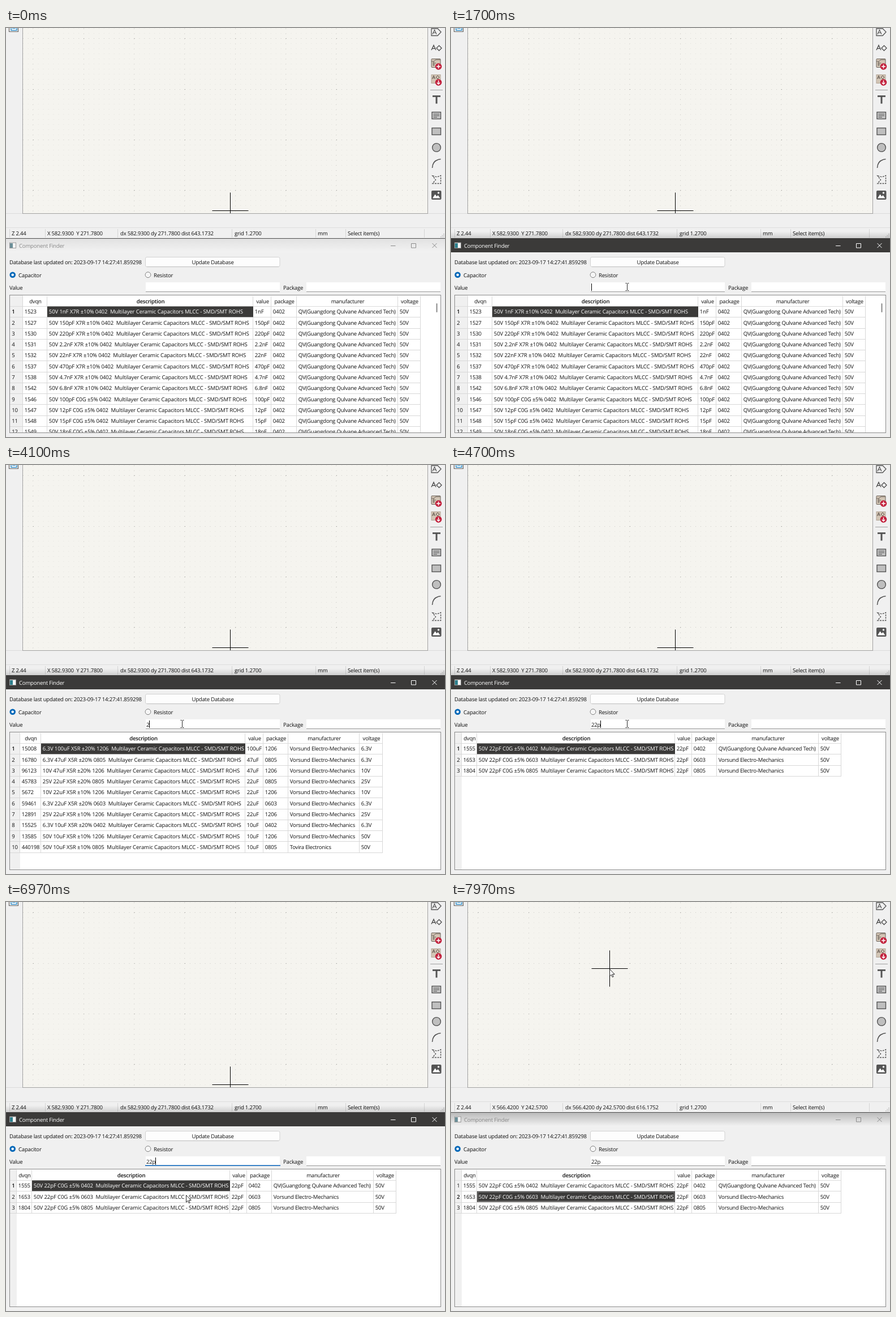
Recreate the animation shown at these times as an HTML page. Size 776 px wide and 722 px high, loop 8 s.

```html
<!DOCTYPE html>
<html lang="en">
<head>
<meta charset="utf-8">
<title>Component Finder</title>
<style>
html, body { margin: 0; width: 100%; height: 100%; overflow: hidden; background: #f0f0f0; }
svg { display: block; width: 776px; height: 722px; }
text {
  font: 9.6px "Open Sans", "Noto Sans", sans-serif;
  letter-spacing: -.23px; white-space: pre; text-rendering: geometricPrecision; fill: #111;
}
.b { font-weight: 600; }
.m { text-anchor: middle; }
.wide { letter-spacing: -.13px; }
.sel { fill: #fff; }
</style>
</head>
<body>
<svg id="stage" viewBox="0 0 776 722" xmlns="http://www.w3.org/2000/svg"></svg>
<script>
const LOOP = 8000, STEP = 200 / 3, CELL = 8.937;
const ORIGIN = { x: 396.3, y: 322.6, col: 459, row: 214 };
const INK = '#545454';

const rect = (x, y, w, h, fill, more = '') =>
  `<rect x="${x}" y="${y}" width="${w}" height="${h}" fill="${fill}" ${more}/>`;
const text = (x, y, s, more = '') => `<text x="${x}" y="${y}" ${more}>${s}</text>`;
const path = (d, stroke, more = '') => `<path d="${d}" fill="none" stroke="${stroke}" ${more}/>`;
const vline = (x, y1, y2, stroke) => path(`M${x} ${y1}V${y2}`, stroke);
const hline = (y, x1, x2, stroke) => path(`M${x1} ${y}H${x2}`, stroke);

// ---- static parts ----
function grid() {
  const x0 = ORIGIN.x - 41 * CELL, y0 = ORIGIN.y - 36 * CELL;
  const dash = step => `stroke-dasharray="1 ${step - 1}"`;
  let out = '';
  for (let i = 0; i < 37; i++) {
    const y = Math.floor(y0 + i * CELL) + .5, major = (ORIGIN.row - 36 + i) % 10 === 0;
    out += path(`M${x0} ${y}H745`, major ? '#c9c8c4' : '#e2e1dc', dash(CELL));
    if (major) out += path(`M${ORIGIN.x - 39 * CELL} ${y}H745`, '#8f8f8c', dash(CELL * 10));
  }
  for (let i = 0; i < 8; i++) {
    const x = Math.floor(ORIGIN.x + (i * 10 - 39) * CELL) + .5;
    out += path(`M${x} ${y0}V327`, '#cfcec9', dash(CELL));
  }
  return out;
}

function badge(y, sign) {
  return `<circle cx="764.5" cy="${y}" r="5.8" fill="#c2203c"/>` +
    path(sign, '#fff', 'stroke-width="1.5"');
}

function toolbar() {
  const solid = `stroke="${INK}" stroke-width="1.4"`;
  return path('M5.5 0V6.5H21.5V0', '#666', 'stroke-width="1.2"') +
    rect(9, -4, 10, 8, '#fff', 'stroke="#1a81c4" stroke-width="1.3"') + hline(.5, 11, 17, '#1a81c4') +
    path('M752 1H763L769 7 763 13.5H752Z', INK, 'stroke-width="1.3"') +
    path('M754 11L757.5 3.5 761 11M755.5 8.5H759.7', INK, 'stroke-width="1.2"') +
    path('M752 39L756 30.5 760 39M753.5 36.2H758.5M761 35.5L765.5 31 770 35.5 765.5 40Z', INK, 'stroke-width="1.4"') +
    rect(752, 54.5, 16, 15, '#d3c5b5', 'stroke="#6b625a" rx="1"') +
    path('M752 59H756L760 56H768M754 62H760M754 65H758M756 59V67', '#6b625a') +
    badge(68, 'M761 68H768M764.5 64.5V71.5') +
    rect(752, 82.5, 16, 15, '#d3c5b5', 'stroke="#b3a697"') +
    path('M753.5 90L756 84 758.5 90M754.5 88H757.5M760 87L763 84 766 87 763 90Z', '#5a5149') +
    badge(96, 'M764.5 92.5V99M761.8 96.5L764.5 99.2 767.2 96.5') +
    hline(109.5, 750, 772, '#a0a0a0') +
    rect(754, 119, 14, 2.8, INK) + rect(759.5, 119, 3, 14.5, INK) +
    rect(753, 148.5, 15.5, 12, '#c4c4c4', solid) + path('M755.5 152H766M755.5 154.8H766M755.5 157.5H762', INK) +
    rect(753, 176.5, 15.5, 12, '#bfbfbf', solid) +
    `<circle cx="761" cy="211" r="7.4" fill="#bfbfbf" ${solid}/>` +
    path('M753.5 247Q754 233 768.5 231.5', INK, 'stroke-width="1.5"') +
    path('M754 261L762 263 768.5 260.5V274.5H754L759.5 268Z', INK, 'stroke-width="1.4" stroke-dasharray="3 1.6"') +
    rect(752, 287, 17.5, 16, INK, 'rx="2"') +
    '<path d="M754 300.5L758.5 293.5 761.5 297.5 763.5 295 767.5 300.5Z" fill="#fff"/>' +
    '<circle cx="764.5" cy="291" r="1.7" fill="#fff"/>';
}

function statusBar() {
  let out = rect(0, 353, 776, 18, '#f0f0f0') + hline(352.5, 0, 776, '#dedede');
  for (const x of [6.5, 69.5, 197.5, 399.5, 547.5, 600.5, 739.5]) out += vline(x, 355, 370, '#d4d4d4');
  for (let i = 0; i < 6; i++) {
    const row = i < 3 ? 2 : i < 5 ? 1 : 0, col = [0, 1, 2, 1, 2, 2][i];
    out += rect(768 + col * 2.6, 363 + row * 2.6, 1.4, 1.4, '#b0b0b0');
  }
  return out + text(10, 366, 'Z 2.44') + text(404, 366, 'grid 1.2700') +
    text(551, 366, 'mm') + text(604, 366, 'Select item(s)');
}

function form() {
  const field = (x, w) => rect(x, 449, w, 17, '#fff') + hline(465.5, x, x + w, '#9a9a9a');
  return rect(0, 396, 776, 326, '#f0f0f0') +
    text(6, 417.3, 'Database last updated on: 2023-09-17 14:27:41.859298') +
    rect(246.5, 404.5, 237.5, 17, '#fdfdfd', 'stroke="#d2d2d2" rx="2.5"') + hline(421.5, 249, 482, '#bdbdbd') +
    text(365.5, 417.3, 'Update Database', 'class="m"') +
    '<circle cx="11.7" cy="435.7" r="5.3" fill="#0067b8"/><circle cx="11.7" cy="435.7" r="2.3" fill="#fff"/>' +
    '<circle cx="251" cy="435.7" r="4.9" fill="#f6f6f6" stroke="#808080"/>' +
    text(22, 439.6, 'Capacitor') + text(261, 439.6, 'Resistor') +
    text(6, 461.5, 'Value') + text(490, 461.5, 'Package') +
    field(247, 237) + field(531, 237);
}

// ---- tables: rows are "id volts value dielectric tolerance package maker" ----
const HEADS = ['dvqn', 'description', 'value', 'package', 'manufacturer', 'voltage'];
const MAKERS = {
  Q: 'QV(Guangdong Qulvane Advanced Tech)',
  V: 'Vorsund Electro-Mechanics',
  T: 'Tovira Electronics'
};
const expand = (list, head, tail) => list.split(',').map(r => {
  const [id, val] = r.split(' ');
  return `${id} ${head} ${val} ${tail}`;
});
const TABLES = [
  {
    edges: [30, 73, 437, 469, 514, 693, 733], bar: true,
    rows: [
      ...expand('1523 1nF,1527 150pF,1530 220pF,1531 2.2nF,1532 22nF,1537 470pF,1538 4.7nF,1542 6.8nF', '50V', 'X7R 10 0402 Q'),
      ...expand('1546 100pF,1547 12pF,1548 15pF,1549 18pF', '50V', 'C0G 5 0402 Q')
    ]
  },
  {
    edges: [25, 62, 423, 455, 499, 625, 666],
    rows: [
      '15008 6.3V 100uF X5R 20 1206 V', '16780 6.3V 47uF X5R 20 0805 V', '96123 10V 47uF X5R 20 1206 V',
      '45783 25V 22uF X5R 20 0805 V', '5672 10V 22uF X5R 10 1206 V', '59461 6.3V 22uF X5R 20 0603 V',
      '12891 25V 22uF X5R 10 1206 V', '15525 6.3V 10uF X5R 20 0402 V', '13585 50V 10uF X5R 10 1206 V',
      '440198 50V 10uF X5R 10 0805 T'
    ]
  },
  {
    edges: [19, 46, 396, 426, 470, 650, 690],
    rows: ['1555 50V 22pF C0G 5 0402 Q', '1653 50V 22pF C0G 5 0603 V', '1804 50V 22pF C0G 5 0805 V']
  }
];
const TOP = 491.5, PITCH = 19.27;

function cells(row) {
  const [id, volts, val, kind, tol, pkg, maker] = row.split(' ');
  const desc = `${volts} ${val} ${kind} ±${tol}% ${pkg}  Multilayer Ceramic Capacitors MLCC - SMD/SMT ROHS`;
  return [id, desc, val, pkg, MAKERS[maker], volts];
}

function table({ edges, rows, bar }, sel, hover) {
  const left = edges[0], right = edges[6], bottom = TOP + rows.length * PITCH;
  let out = rect(7, 472, 761, 242, '#fff') + rect(7, 472, left - 7, 242, '#f0f0f0');
  if (hover >= 0) out += rect(edges[hover], 473, edges[hover + 1] - edges[hover], 18, '#d9ebf9');
  HEADS.forEach((h, i) => {
    out += text((edges[i] + edges[i + 1]) / 2 + .5, 485.6, h, `class="m${i === 1 ? ' b' : ''}"`);
  });
  out += hline(TOP, 7, right, '#dcdcdc');
  for (const x of edges) out += vline(x - .5, 473, bottom, '#d8d8d8');
  rows.forEach((row, r) => {
    const y = TOP + r * PITCH, on = r === sel;
    out += hline(Math.floor(y + PITCH) + .5, 7, right, '#d8d8d8');
    out += text(10.3, y + 12.9, r + 1, on ? 'class="b"' : '');
    if (on) {
      const w = edges[2] - edges[1];
      out += rect(edges[1], y, w, PITCH - .5, '#3b3a39');
      if (r) out += rect(edges[1] + 1.5, y + 1.5, w - 3, PITCH - 3.5, 'none', 'stroke="#bbb" stroke-dasharray="1 1"');
    }
    cells(row).forEach((s, c) => {
      out += text(edges[c] + 2.8, y + 12.9, s, c === 1 ? `class="wide${on ? ' sel' : ''}"` : '');
    });
  });
  if (bar) out += rect(760.5, 486, 2, 16, '#8a8a8a', 'rx="1"');
  return `<g clip-path="url(#listClip)">${out}</g>` + rect(6.5, 471.5, 762, 243, 'none', 'stroke="#8c8c8c"');
}

function titleBar(active, shade) {
  const ink = active ? '#fff' : '#8a8a8a';
  return (active ? rect(0, 359, 776, 12, 'url(#up)') : '') +
    rect(0, 371, 776, 25, active ? '#3b3a39' : '#f2f2f2') +
    (active ? '' : rect(0, 371, 776, 25, 'url(#down)', `opacity="${shade}"`) + hline(371.5, 0, 776, '#4c4c4c')) +
    rect(6.5, 379, 11, 9.5, '#f4f4f4', 'stroke="#9a9a9a"') + rect(7, 380, 5, 8, active ? '#2d7f8c' : '#6b8f98') +
    text(23, 387.7, 'Component Finder', `style="fill:${ink}"`) +
    path('M680 384.5H688.5M716.5 380.5H724.5V388H716.5ZM753.5 380L761.5 388M761.5 380L753.5 388', ink);
}

// ---- motion ----
const TRACK = [
  [500, 1, 540], [567, 20, 507], [633, 52, 480], [767, 130, 461], [1000, 250, 450], [1234, 308, 449],
  [1300, 310, 453], [1420, 310, 453], [1430, 311, 457], [5700, 311, 457], [5966, 314, 463], [6100, 316, 474],
  [6234, 317, 490], [6432, 318, 517], [7300, 318, 517], [7367, 318, 508], [7433, 317, 479],
  [7633, 306, 345], [7833, 286, 170], [7966, 280, 117.5]
];
function pointer(t) {
  const q = 500 + STEP * Math.floor((t - 495) / STEP);
  let i = 0;
  while (i < TRACK.length - 2 && TRACK[i + 1][0] <= q) i++;
  const [ta, xa, ya] = TRACK[i], [tb, xb, yb] = TRACK[i + 1];
  const k = Math.min(1, Math.max(0, (q - ta) / (tb - ta)));
  return { x: Math.round(xa + (xb - xa) * k), y: Math.round(ya + (yb - ya) * k) };
}

const BLINK = [[1700, 2230], [2770, 3300], [3770, 5370], [5770, 6300], [6970, 7100]];
const typed = t => t < 4100 ? '' : t < 4300 ? '2' : t < 4700 ? '22' : '22p';

function crosshair(p, t) {
  const inside = t > 7000 && p.y < 327;
  const dx = inside ? Math.round((p.x - ORIGIN.x) / CELL) : 0;
  const dy = inside ? Math.round((p.y - ORIGIN.y) / CELL) : 0;
  const x = Math.floor(ORIGIN.x + dx * CELL) + .5, y = Math.floor(ORIGIN.y + dy * CELL) + .5;
  const mx = (ORIGIN.col + dx) * 1.27, my = (ORIGIN.row + dy) * 1.27;
  const [sx, sy, d] = [mx, my, Math.hypot(mx, my)].map(v => v.toFixed(4));
  return `<g clip-path="url(#sheetClip)">${path(`M${x - 32} ${y}H${x + 32}M${x} ${y - 32}V${y + 32}`, '#000')}</g>` +
    text(73, 366, `X ${sx}  Y ${sy}`) + text(202, 366, `dx ${sx} dy ${sy} dist ${d}`);
}

function cursor({ x, y }, beam) {
  const d = beam
    ? 'M-2.5 -6.5H-.5L.5 -5.5 1.5 -6.5H3.5M.5 -5.5V5.5M-2.5 6.5H-.5L.5 5.5 1.5 6.5H3.5'
    : 'M.5 .5V13L3.4 10.3 5.3 14.6 7.2 13.8 5.3 9.6H9.2Z';
  return `<path transform="translate(${x} ${y})" d="${d}" fill="${beam ? 'none' : '#fff'}" stroke="#111" stroke-width=".9"/>`;
}

const stage = document.getElementById('stage');
stage.innerHTML = `<defs>
  <clipPath id="sheetClip">${rect(30, 0, 715, 327, '#000')}</clipPath>
  <clipPath id="listClip">${rect(7, 472, 761, 242, '#000')}</clipPath>
  <linearGradient id="up" x2="0" y2="1"><stop stop-opacity="0"/><stop offset="1" stop-opacity=".14"/></linearGradient>
  <linearGradient id="down" x2="0" y2="1"><stop stop-opacity=".24"/><stop offset="1" stop-opacity="0"/></linearGradient>
</defs>` + rect(0, 0, 776, 722, '#f0f0f0') + rect(29.5, -2, 716, 329.5, '#f5f4ef', 'stroke="#a2a2a2"') +
  `<g clip-path="url(#sheetClip)">${grid()}</g>` + hline(327.5, 0, 29, '#dadada') + hline(327.5, 746, 776, '#dadada') +
  toolbar() + statusBar() + form() +
  ['cross', 'bar', 'list', 'entry', 'mouse'].map(id => `<g id="${id}"></g>`).join('');

const shown = {};
function put(id, markup) {
  if (shown[id] === markup) return;
  shown[id] = markup;
  document.getElementById(id).innerHTML = markup;
}

function draw(t) {
  const p = pointer(t), visible = t >= 495, focused = t >= 1700 && t < 7100;
  const over = visible && p.x > 247 && p.x < 484 && p.y >= 449 && p.y < 466;
  const kind = t < 4100 ? 0 : t < 4700 ? 1 : 2;
  const { edges } = TABLES[kind];
  const hover = visible && p.y > 472 && p.y < 492 && p.x < edges[6]
    ? edges.filter(x => x <= p.x).length - 1 : -1;
  const value = typed(t), caret = BLINK.some(([a, b]) => t >= a && t < b);

  put('cross', crosshair(p, t));
  put('bar', titleBar(t >= 1700 && t < 7895, t < 1700 ? .3 : 1));
  put('list', table(TABLES[kind], t < 7100 ? 0 : 1, hover));
  put('entry', text(248, 461.5, value) +
    (focused && !over ? rect(246, 464.5, 239, 1.5, '#005fb8') : '') +
    (caret ? vline(248.5 + Math.round(5.3 * value.length), 451, 464, '#000') : ''));
  put('mouse', visible ? cursor(p, over) : '');
}

const start = performance.now();
function tick() {
  draw((performance.now() - start) % LOOP);
  requestAnimationFrame(tick);
}
tick();
</script>
</body>
</html>
```
